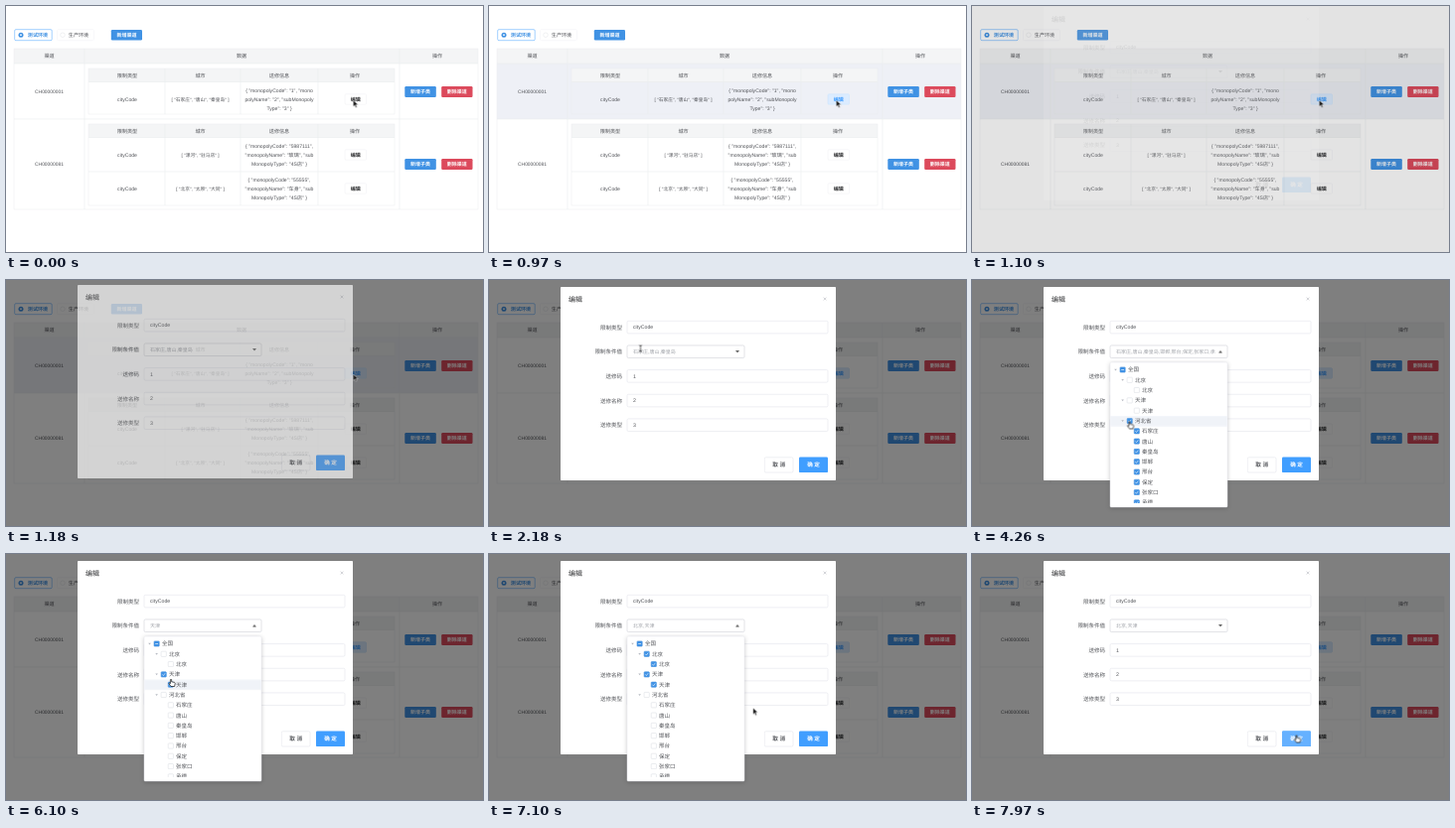
Write an HTML page that moves like this. It is 480 px wide and 248 px high and loops after 8 s.

```html
<!DOCTYPE html>
<html lang="zh">
<head>
<meta charset="utf-8">
<title>编辑</title>
<style>
html, body { margin: 0; width: 100%; height: 100%; overflow: hidden; background: #fff; }
svg { display: block; width: 100vw; height: 100vh; font-family: "Liberation Sans", "Noto Sans CJK SC", "Noto Sans CJK", sans-serif; }
text { white-space: pre; text-rendering: geometricPrecision; }
[class] { animation: 8s infinite step-end; }

.overlay { animation-name: overlay; }
.modal { animation-name: modal; }
@keyframes overlay { 0% { opacity: 0 } 13.75% { opacity: .22 } 14.75%, 100% { opacity: 1 } }
@keyframes modal {
  0% { opacity: 0; transform: translateY(-8px) }
  13.75% { opacity: .12; transform: translateY(-6px) }
  14.75% { opacity: .66; transform: translateY(-2px) }
  15.75%, 100% { opacity: 1; transform: none }
}

.row-hover { animation-name: rowHover; }
.edit-hover { animation-name: editHover; }
.ok-hover { animation-name: okHover; }
@keyframes rowHover { 0% { opacity: 0 } 12.1% { opacity: 1 } 15.75%, 100% { opacity: 0 } }
@keyframes editHover { 0% { opacity: 0 } 12.1%, 100% { opacity: 1 } }
@keyframes okHover { 0% { opacity: 0 } 90.6%, 100% { opacity: 1 } }

.drop { animation-name: drop; transform-origin: 198px 83px; animation-timing-function: ease-out; }
@keyframes drop {
  0%, 29.8% { opacity: 0; transform: scaleY(0) }
  32.5%, 93.3% { opacity: 1; transform: none }
  96%, 100% { opacity: 0; transform: scaleY(0) }
}
.caret { animation-name: caret; transform-origin: 250px 72.3px; }
@keyframes caret { 0% { transform: none } 30% { transform: rotate(180deg) } 94%, 100% { transform: none } }
.item-hover { animation-name: itemHover; }
@keyframes itemHover {
  0% { opacity: 0; transform: translateY(51.5px) }
  46% { opacity: 1; transform: translateY(51.5px) }
  67% { opacity: 1; transform: translateY(41.2px) }
  80% { opacity: 1; transform: translateY(20.6px) }
  87.5%, 100% { opacity: 0; transform: translateY(20.6px) }
}

/* selection states: three cities, whole province, nothing, 天津, 北京 + 天津 */
.any { animation-name: any; }
.first { animation-name: first; }
.some { animation-name: some; }
.full { animation-name: full; }
.tj { animation-name: tj; }
.tj-only { animation-name: tjOnly; }
.bj { animation-name: bj; }
@keyframes any { 0% { opacity: 1 } 62.1% { opacity: 0 } 74.6%, 100% { opacity: 1 } }
@keyframes first { 0% { opacity: 1 } 51.25%, 100% { opacity: 0 } }
@keyframes some { 0% { opacity: 1 } 62.1%, 100% { opacity: 0 } }
@keyframes full { 0% { opacity: 0 } 51.25% { opacity: 1 } 62.1%, 100% { opacity: 0 } }
@keyframes tj { 0% { opacity: 0 } 74.6%, 100% { opacity: 1 } }
@keyframes tjOnly { 0% { opacity: 0 } 74.6% { opacity: 1 } 83%, 100% { opacity: 0 } }
@keyframes bj { 0% { opacity: 0 } 83%, 100% { opacity: 1 } }

.cursor { animation-name: cursor; animation-timing-function: ease-in-out; }
@keyframes cursor {
  0%, 23.6% { transform: translate(349.5px, 95px) }
  27.2%, 40.75% { transform: translate(152.5px, 69px) }
  48.5%, 64% { transform: translate(158.5px, 142.5px) }
  71%, 77.5% { transform: translate(166px, 126px) }
  81.5%, 86.1% { transform: translate(165px, 110px) }
  90.75%, 100% { transform: translate(326.5px, 182.5px) }
}
.arrow { animation-name: arrow; }
.beam { animation-name: beam; }
.hand { animation-name: hand; }
@keyframes arrow { 0% { opacity: 1 } 26.8% { opacity: 0 } 87.6% { opacity: 1 } 90.4%, 100% { opacity: 0 } }
@keyframes beam { 0% { opacity: 0 } 26.8% { opacity: 1 } 43%, 100% { opacity: 0 } }
@keyframes hand { 0% { opacity: 0 } 43% { opacity: 1 } 87.6% { opacity: 0 } 90.4%, 100% { opacity: 1 } }
</style>
</head>
<body>
<script>
const BLUE = '#409eff', DEEP = '#4092e4', RED = '#dc4a5c', LINE = '#eaecef', INK = '#505257', HOVER = '#eef0f6';

const rect = (x, y, w, h, fill, stroke = 'none', r = 0, extra = '') =>
  `<rect x="${x}" y="${y}" width="${w}" height="${h}" rx="${r}" fill="${fill}" stroke="${stroke}" stroke-width=".5" ${extra}/>`;
const line = (x1, y1, x2, y2, stroke = LINE) =>
  `<path d="M${x1} ${y1}L${x2} ${y2}" stroke="${stroke}" stroke-width=".6"/>`;
const text = (s, x, y, { size = 5.1, fill = INK, anchor = 'middle', extra = '' } = {}) =>
  `<text x="${x}" y="${y + size * .36}" font-size="${size}" fill="${fill}" text-anchor="${anchor}" ${extra}>${s}</text>`;
const group = (cls, body) => `<g class="${cls}">${body}</g>`;
const medium = 'font-weight="500"', bold = 'font-weight="700"';

const button = (s, x, y, w, h, fill, size = 5) =>
  rect(x, y, w, h, fill, 'none', 1.2) + text(s, x + w / 2, y + h / 2, { size, fill: '#fff', extra: bold });

function toolbar() {
  return rect(8.7, 23.7, 37.5, 11, '#fff', BLUE, 1.2)
    + `<circle cx="15" cy="29.2" r="2.5" fill="${DEEP}"/><circle cx="15" cy="29.2" r=".9" fill="#fff"/>`
    + text('测试环境', 32, 29.2, { fill: DEEP, extra: bold })
    + rect(51.5, 23.7, 37, 11, '#fff', '#f0f1f4', 1.2)
    + '<circle cx="57" cy="29.2" r="2.3" fill="#fff" stroke="#e0e2e6" stroke-width=".5"/>'
    + text('生产环境', 73, 29.2)
    + button('新增渠道', 105.8, 24, 31.2, 10.5, DEEP);
}

function innerTable(top, bottom, rows, hover = '') {
  const heads = [['限制类型', 122], ['城市', 195.5], ['送修信息', 275], ['操作', 351]];
  let s = hover + rect(83, top, 308, 13.5, '#f4f5f6');
  s += heads.map(([h, x]) => text(h, x, top + 7, { extra: medium })).join('');
  s += rect(83, top, 308, bottom - top, 'none', LINE);
  s += [160, 236, 314].map(x => line(x, top, x, bottom)).join('') + line(83, top + 13.5, 391, top + 13.5);
  for (const { y, cities, info } of rows) {
    s += text('cityCode', 122, y) + text(cities, 195.5, y, { size: 4.7 });
    s += info.map((t, i) => text(t, 275, y + (i - 1) * 8.7)).join('');
    s += rect(341, y - 5.2, 21.5, 10.4, '#fff', '#eeeff2', 1) + text('编辑', 351.8, y, { fill: '#303133', extra: bold });
  }
  return s;
}

function page() {
  const vin = (code, name) => [`{ "monopolyCode": "${code}",`, `"monopolyName": "${name}", "sub`, 'MonopolyType": "4S店" }'];
  let s = toolbar() + rect(8, 43, 467, 15, '#f4f5f6');
  s += [['渠道', 43.5], ['数据', 237], ['操作', 434]].map(([h, x]) => text(h, x, 50.5, { extra: medium })).join('');
  s += innerTable(63, 109, [{ y: 94, cities: '[ "石家庄", "唐山", "秦皇岛" ]',
    info: ['{ "monopolyCode": "1", "mono', 'polyName": "2", "subMonopoly', 'Type": "3" }'] }],
    group('row-hover', rect(8, 58, 467, 56, HOVER)));
  s += group('edit-hover', rect(341, 88.8, 21.5, 10.4, '#dcecff', '#c6e2ff', 1) + text('编辑', 351.8, 94, { fill: BLUE, extra: bold }));
  s += innerTable(119, 201, [
    { y: 150, cities: '[ "漯河", "驻马店" ]', info: vin('5987111', '玻璃') },
    { y: 184, cities: '[ "北京", "太原", "大同" ]', info: vin('55555', '车身') }]);
  s += line(83, 167, 391, 167);
  [['CH00000001', 86.5], ['CH00000081', 159.5]].forEach(([id, y]) => {
    s += text(id, 43.5, y, { size: 4.9 }) + button('新增子类', 401.3, y - 5.4, 31.5, 10.8, DEEP) + button('删除渠道', 438.2, y - 5.4, 31.3, 10.8, RED);
  });
  s += rect(8, 43, 467, 162, 'none', LINE) + line(8, 58, 475, 58) + line(8, 114, 475, 114);
  return s + line(79, 43, 79, 205) + line(396, 43, 396, 205);
}

function modal() {
  const left = { anchor: 'start', size: 5.2 };
  const grey = { anchor: 'start', size: 5, fill: '#a0a3a9' };
  const fields = [['限制类型', 'cityCode'], ['限制条件值', ''], ['送修码', '1'], ['送修名称', '2'], ['送修类型', '3']];
  let s = rect(72, 7, 277, 195, '#fff', 'none', .8) + text('编辑', 80, 19, { size: 7, anchor: 'start', fill: '#303133', extra: medium });
  s += '<path d="M336.6 17.6l2.8 2.8m0-2.8l-2.8 2.8" stroke="#a8abb2" stroke-width=".5"/>';
  fields.forEach(([label, value], i) => {
    const y = 47.6 + i * 24.65;
    s += text(label, 134, y, { size: 5.5, anchor: 'end', extra: medium });
    s += rect(139, y - 6.3, i == 1 ? 118 : 202, 12.6, '#fff', i == 1 ? '#c4c7ce' : '#dcdfe6', 1.3) + text(value, 145, y, left);
  });
  const values = { first: '石家庄,唐山,秦皇岛', full: '石家庄,唐山,秦皇岛,邯郸,邢台,保定,张家口,承德', 'tj-only': '天津', bj: '北京,天津' };
  s += '<clipPath id="value"><rect x="144" y="66" width="101" height="13"/></clipPath><g clip-path="url(#value)">';
  for (const cls in values) s += group(cls, text(values[cls], 145, 72.3, grey));
  s += '</g>' + group('caret', '<path d="M248 71.1h4l-2 2.5z" fill="#666"/>');
  s += rect(277.3, 178.8, 28.7, 15.2, '#fff', '#dcdfe6', 1.4) + text('取 消', 291.7, 186.4, { size: 5.6, extra: bold });
  s += button('确 定', 312, 178.5, 29, 15.6, BLUE, 5.6);
  return s + group('ok-hover', button('确 定', 312, 178.5, 29, 15.6, '#66b1ff', 5.6));
}

function dropdown() {
  // label, depth, checked state, partially checked state
  const items = [['全国', 0, '', 'any'], ['北京', 1, 'bj'], ['北京', 2, 'bj'], ['天津', 1, 'tj'], ['天津', 2, 'tj'],
    ['河北省', 1, 'full', 'first'], ...['石家庄', '唐山', '秦皇岛'].map(n => [n, 2, 'some']),
    ...['邯郸', '邢台', '保定', '张家口', '承德'].map(n => [n, 2, 'full'])];
  let s = rect(139, 83, 118, 146, '#fff', '#e4e7ed', 1, 'filter="drop-shadow(0 1px 2px #0003)"');
  s += '<clipPath id="list"><rect x="139" y="84" width="118" height="140.5"/></clipPath><g clip-path="url(#list)">';
  s += group('item-hover', rect(139.3, 85.4, 117.4, 10.3, '#f0f3f8'));
  items.forEach(([name, depth, on, part], i) => {
    const y = 90.5 + i * 10.3, x = 151.6 + depth * 7.1;
    const box = fill => rect(x - 2.6, y - 2.6, 5.2, 5.2, fill, fill == '#fff' ? '#d5d8de' : fill, .7);
    if (depth < 2) s += `<path d="M${x - 8.4} ${y - .8}h2.6l-1.3 1.7z" fill="#b4b8c0"/>`;
    s += box('#fff');
    if (part) s += group(part, box(DEEP) + line(x - 1.4, y, x + 1.4, y, '#fff'));
    if (on) s += group(on, box(DEEP) + `<path d="M${x - 1.4} ${y}l1.1 1.2 1.8-2.4" fill="none" stroke="#fff" stroke-width=".6"/>`);
    s += text(name, x + 5.3, y, { size: 5.5, anchor: 'start' });
  });
  return s + '</g>';
}

const cursor = () =>
  group('arrow', '<path d="M0 0v6.4l1.5-1.4 1.1 2.4 1-.5-1-2.3h2.1z" fill="#111" stroke="#fff" stroke-width=".4"/>')
  + group('beam', '<path d="M-1.3-3.2q1.3 0 1.3.8v4.8q0 .8-1.3.8M1.3-3.2Q0-3.2 0-2.4M1.3 3.2Q0 3.2 0 2.4" fill="none" stroke="#222" stroke-width=".7"/>')
  + group('hand', '<path d="M-.6.6q.6-.8 1.2 0v2.2l2.9.6q.8.3.7 1.3l-.6 2.8h-3.6l-2-2.8q0-.9.9-.6l.5.5z" fill="#fff" stroke="#111" stroke-width=".7" stroke-linejoin="round"/>');

document.body.innerHTML = `<svg viewBox="0 0 480 248">
  ${rect(0, 0, 480, 248, '#fff')}${page()}
  ${group('overlay', rect(0, 0, 480, 248, 'rgba(0,0,0,.5)'))}
  ${group('modal', modal())}
  ${group('drop', dropdown())}
  ${group('cursor', cursor())}
</svg>`;
</script>
</body>
</html>
```
